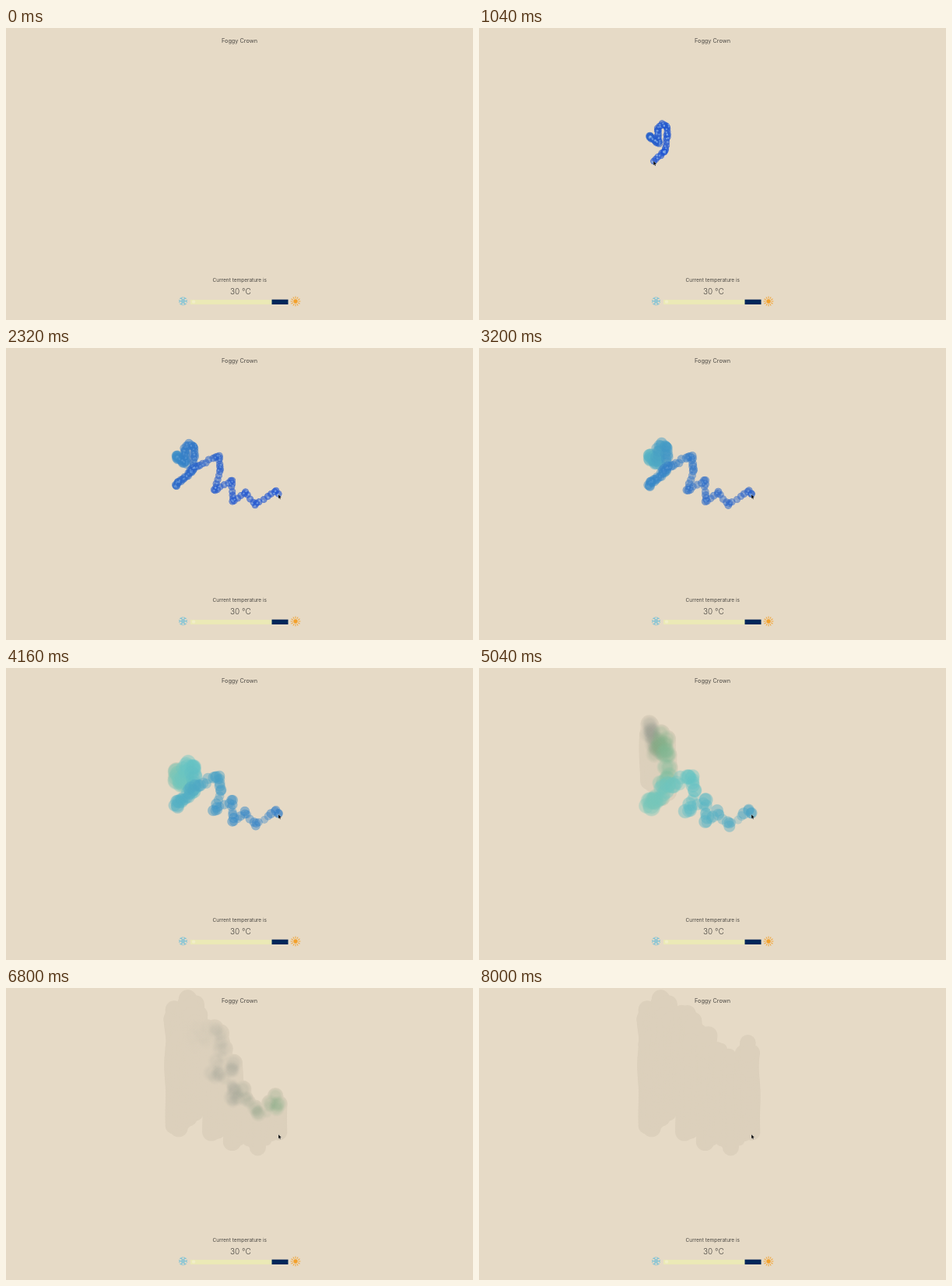
Write an HTML page with a canvas that moves like this. It is 600 px wide and 375 px high and loops after 8.8 s.

```html
<!DOCTYPE html>
<html lang="en">
<head>
<meta charset="utf-8">
<title>Evaporating ink</title>
<style>
  html, body { margin: 0; width: 100%; height: 100%; overflow: hidden; background: #e6dac6; }
  canvas, svg { position: absolute; left: 0; top: 0; width: 600px; height: 375px; display: block; }
  text { font-family: Inter, "Open Sans", sans-serif; fill: #4b4843; text-anchor: middle; }
</style>
</head>
<body>
<canvas id="ink" width="600" height="375"></canvas>
<svg viewBox="0 0 600 375">
  <text x="300" y="18.8" font-size="7.3">Foggy Crown</text>
  <text x="300.3" y="326.3" font-size="6.5">Current temperature is</text>
  <text x="301.3" y="341.7" font-size="10" font-weight="300">30 °C</text>
  <rect x="237" y="349" width="105" height="6" fill="#ebe9b6"/>
  <circle cx="241" cy="351.6" r="2.2" fill="#f1eec8"/>
  <rect x="341.5" y="348.7" width="21" height="6.3" fill="#00275a"/>
  <g id="snow" transform="translate(227.5 350.8)" fill="none" stroke="#74c0d8" stroke-width=".8"></g>
  <g id="sun" transform="translate(372 351)" stroke="#f3a12c" stroke-width=".9" stroke-linecap="round">
    <circle r="2.7" fill="#f3a12c" stroke="none"/>
  </g>
  <path id="cursor" d="M0 0V5.4L1.2 4.4 2 6.3 3 5.9 2.2 4.1 3.9 4Z" fill="#000" stroke="#fff" stroke-width=".4" stroke-opacity=".6"/>
</svg>
<script>
const LOOP = 8800, STEP = 80, LAST = 8000;
const START = 80, STROKE = 2240, END = 2360, GAP = 20;
const BOIL = 4, RISE_TIME = 1.75, FADE_TIME = 1.55;
const BG = '#e6dac6', STAIN = '#dcd0bc';

// corners of the brush stroke
const corners = [
  [219, 139], [231, 148], [229, 130], [236, 123], [242, 126], [242, 138], [238, 159],
  [217, 177], [242, 154], [274, 138], [275, 153], [268, 183], [290, 170], [291, 197],
  [308, 185], [319, 201], [347, 184], [350, 188]
];

const ctx = document.getElementById('ink').getContext('2d');
const cursor = document.getElementById('cursor');
const clamp = (v, lo = 0, hi = 1) => Math.min(hi, Math.max(lo, v));
const mix = (a, b, f) => a + (b - a) * f;

const legs = corners.slice(1).map(([x, y], i) => {
  const [px, py] = corners[i];
  return { px, py, x, y, length: Math.hypot(x - px, y - py) };
});
const total = legs.reduce((sum, leg) => sum + leg.length, 0);

// the hand speeds up over the stroke and slows at each corner
function brushAt(t) {
  let left = total * clamp((t - START) / STROKE) ** 1.5;
  const leg = legs.find(l => left <= l.length || (left -= l.length, false)) || legs[legs.length - 1];
  const f = clamp(left / leg.length);
  const eased = f - .4 * Math.sin(2 * Math.PI * f) / (2 * Math.PI);
  return [mix(leg.px, leg.x, eased), mix(leg.py, leg.y, eased)];
}

let seed = 7;
function random() {
  seed = (seed * 16807) % 2147483647;
  return seed / 2147483647;
}
const spread = () => random() * 2 - 1;
for (let i = 0; i < 5; i++) random();

const dabs = [];
for (let born = START; born < END; born += GAP) {
  const [x, y] = brushAt(born), [nx, ny] = brushAt(born + GAP);
  const pace = Math.hypot(nx - x, ny - y);
  dabs.push({
    born, x, y,
    jx: spread(), jy: spread(), drift: spread(), phase: random() * 6,
    delay: spread() * .12, rise: 96 + random() * 14,
    grow: clamp((8 - pace) / 4, .2) * (.8 + random() * .25)
  });
}

const lift = (d, age) => d.rise * (1 - (1 - clamp((age - BOIL - d.delay) / RISE_TIME)) ** 1.2);
const radius = (d, age) => 4.6 + .44 * Math.min(age, BOIL) ** 2 * d.grow;

function place(d, age, rise) {
  const loose = 1 + Math.min(age, BOIL) ** 2 * .23;
  return [
    d.x + d.jx * loose + d.drift * rise / 30 + Math.sin(rise / 12 + d.phase) * rise / 70,
    d.y + d.jy * loose - rise
  ];
}

// blue cools to teal, then greys out as steam
function tone(d, age) {
  const wet = clamp(age / BOIL), steam = clamp((age - BOIL) / .8);
  const fade = clamp((age - BOIL) / FADE_TIME);
  const hue = 222 - 54 * wet ** 1.9 - 80 * steam;
  const sat = 76 - 36 * wet ** .9 - 35 * steam;
  const light = 47 + 16 * wet ** 2.5 - 6 * steam;
  const alpha = (.62 - .2 * wet) * (1 - fade) * (1 - (1 - clamp(d.grow)) * wet * .8);
  return a => `hsla(${hue},${sat}%,${light}%,${alpha * a})`;
}

function disc(x, y, r, fill) {
  ctx.fillStyle = fill;
  ctx.beginPath();
  ctx.arc(x, y, r, 0, Math.PI * 2);
  ctx.fill();
}

function drawStain(d, age) {
  const top = lift(d, age);
  for (let rise = 0; rise < top + 4; rise += 4) {
    const [x, y] = place(d, age, Math.min(rise, top));
    disc(x, y, radius(d, age), STAIN);
  }
}

function drawDab(d, age) {
  const [x, y] = place(d, age, lift(d, age)), r = radius(d, age) + .3;
  const color = tone(d, age), fill = ctx.createRadialGradient(x, y, 0, x, y, r);
  fill.addColorStop(0, color(1));
  fill.addColorStop(.85 - .3 * clamp((age - BOIL) * 2), color(1));
  fill.addColorStop(1, color(0));
  disc(x, y, r, fill);
}

function drawBubble(d, age) {
  const shine = .5 * clamp(1 - age / 2.6);
  disc(d.x + d.drift * 2, d.y + d.jx * 2, 1.2, `rgba(175,212,244,${shine})`);
}

function render(t) {
  ctx.fillStyle = BG;
  ctx.fillRect(0, 0, 600, 375);
  const live = dabs.filter(d => d.born <= t).map(d => [d, (t - d.born) / 1000]);
  for (const [d, age] of live) if (age > BOIL) drawStain(d, age);
  for (const [d, age] of live) drawDab(d, age);
  for (const [d, age] of live) drawBubble(d, age);
  cursor.setAttribute('transform', `translate(${brushAt(t).join(' ')})`);
  cursor.setAttribute('visibility', t < START ? 'hidden' : 'visible');
}

function spokes(id, count, d) {
  for (let i = 0; i < count; i++) {
    const p = document.createElementNS('http://www.w3.org/2000/svg', 'path');
    p.setAttribute('d', d);
    p.setAttribute('transform', `rotate(${i * 360 / count + 30})`);
    document.getElementById(id).append(p);
  }
}
spokes('snow', 6, 'M0 0V-5.6M-2 -5.2L0 -3.6 2 -5.2M0 -2.4L2.08 -1.2');
spokes('sun', 12, 'M0 -3.9V-6');

let shown = -1;
function tick() {
  const t = Math.min(LAST, Math.floor(performance.now() % LOOP / STEP) * STEP);
  if (t !== shown) render(shown = t);
  requestAnimationFrame(tick);
}
tick();
</script>
</body>
</html>
```
